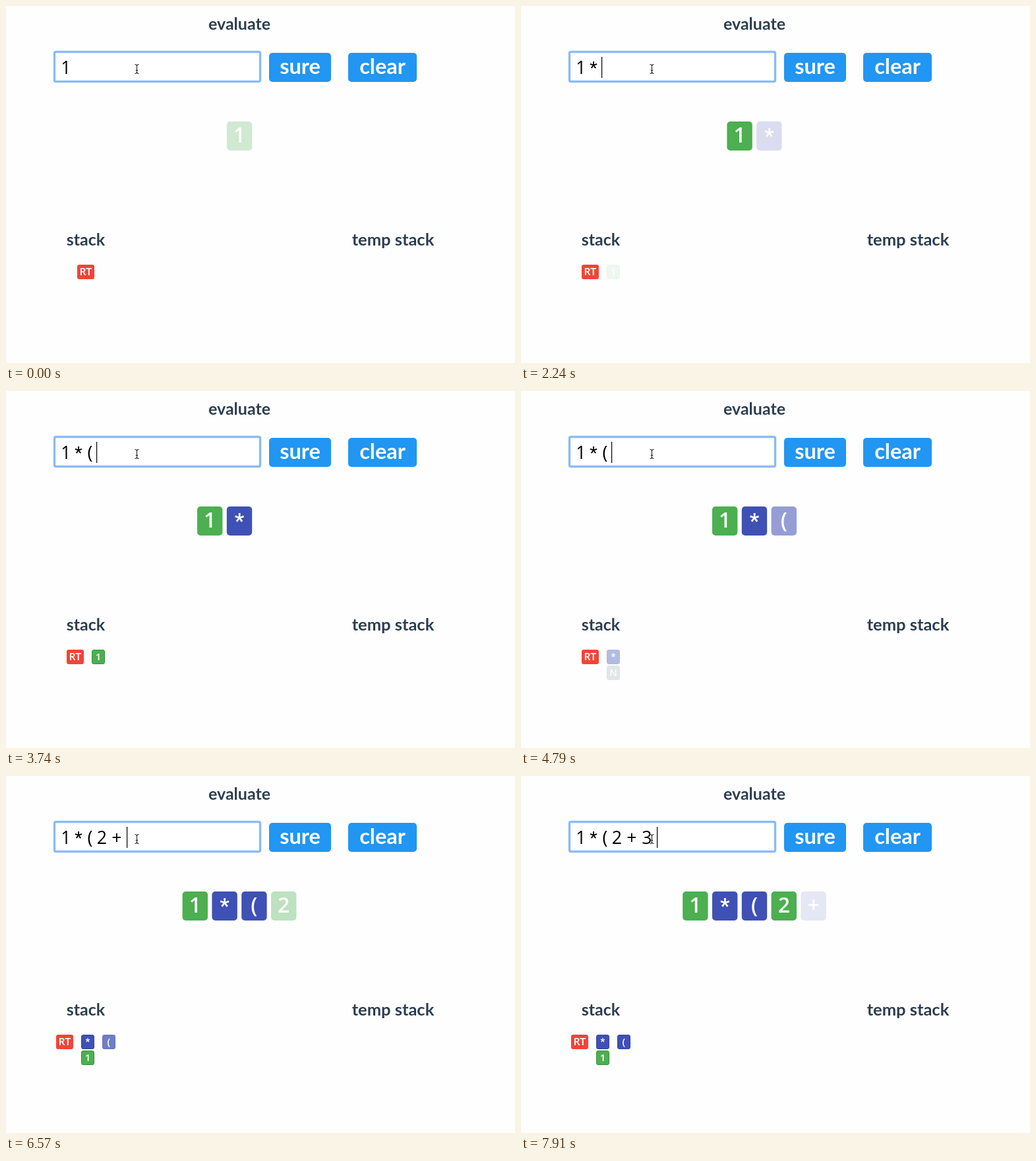
Write an HTML page that moves like this. It is 772 px wide and 541 px high and loops after 8 s.

```html
<!DOCTYPE html>
<html lang="en">
<head>
<meta charset="utf-8">
<title>evaluate</title>
<style>
html, body { margin: 0; width: 100%; height: 100%; overflow: hidden; background: #fefefe; }
svg { display: block; width: 772px; height: 541px; }
text { text-anchor: middle; }
.word { font-family: Lato, sans-serif; font-weight: 700; }
.glyph { font-family: "Open Sans", sans-serif; }
.star { font-family: Roboto, sans-serif; }
.bold { font-weight: 600; }
</style>
</head>
<body>
<svg id="stage" viewBox="0 0 772 541" xmlns="http://www.w3.org/2000/svg"></svg>
<script>
const LOOP = 8000;
const GREEN = '#4caf50', INDIGO = '#3f51b5', BLUE = '#2196f3', RED = '#f44336';
const GREY = '#b0bec5', INK = '#2c3e50';
const stage = document.getElementById('stage');

function add(parent, tag, attrs, content) {
  const el = document.createElementNS('http://www.w3.org/2000/svg', tag);
  for (const k in attrs) el.setAttribute(k, attrs[k]);
  if (content) el.textContent = content;
  parent.appendChild(el);
  return el;
}

function word(parent, str, x, y, size, fill) {
  return add(parent, 'text', { class: 'word', x, y, 'font-size': size, fill }, str);
}

function glyph(parent, ch, x, y, size, fill, bold) {
  const cls = (ch === '*' ? 'star' : 'glyph') + (bold ? ' bold' : '');
  return add(parent, 'text', { class: cls, x, y, 'font-size': size, fill }, ch);
}

function button(str, x, w) {
  add(stage, 'rect', { x, y: 71, width: w, height: 44, rx: 5, fill: BLUE });
  word(stage, str, x + w / 2, 103, 32.5, '#fff');
}

function bigTile(ch, fill) {
  const g = add(stage, 'g', {});
  add(g, 'rect', { y: 175, width: 38.4, height: 44, rx: 5, fill });
  glyph(g, ch, 19.2, 207, 32, '#fff', true);
  return g;
}

function smallTile(ch, fill, edge) {
  const g = add(stage, 'g', {});
  add(g, 'rect', { x: 0.5, y: 0.5, width: 19, height: 21, rx: 2.5, fill, stroke: edge });
  glyph(g, ch, 10, 16, 15, '#fff', true);
  return g;
}

function place(el, x, y, alpha) {
  el.setAttribute('transform', `translate(${x} ${y})`);
  el.setAttribute('opacity', alpha);
}

const show = (el, on) => el.setAttribute('opacity', on ? 1 : 0);
const ramp = (t, start, length) => Math.min(1, Math.max(0, (t - start) / length));

// Fixed parts
add(stage, 'rect', { width: 772, height: 541, fill: '#fefefe' });
word(stage, 'evaluate', 354, 36, 25, INK);
word(stage, 'stack', 121, 363, 25, INK);
word(stage, 'temp stack', 587, 363, 25.5, INK);
const field = { x: 73.5, y: 69.5, width: 312, height: 45, rx: 2 };
add(stage, 'rect', { ...field, fill: '#fff', stroke: '#bcd9fb', 'stroke-width': 4 });
add(stage, 'rect', { ...field, fill: 'none', stroke: '#7ab0f5', 'stroke-width': 2 });
button('sure', 399, 94);
button('clear', 519, 104);

// Typing: each key is followed by a space, after which the caret sits at "end"
const keys = [
  { ch: '1', x: 91, end: 104.5, at: -650, space: -500 },
  { ch: '*', x: 110, end: 122.5, at: 1790, space: 1940 },
  { ch: '(', x: 127.5, end: 137.5, at: 3590, space: 3740 },
  { ch: '2', x: 145.5, end: 159.5, at: 5380, space: 5530 },
  { ch: '+', x: 168, end: 183.5, at: 6300, space: 6440 },
  { ch: '3', x: 191, end: 206.5, at: 7600, space: 7700 }
];
for (const k of keys) k.el = glyph(stage, k.ch, k.x, 103, 26.7, '#000');
const caret = add(stage, 'rect', { y: 77, width: 1.2, height: 32, fill: '#000' });

// Mouse pointer
const beam = 'M195.5 88.5Q198 88.5 198.5 90.5Q199 88.5 201.5 88.5M198.5 90V100.5' +
  'M195.5 102.5Q198 102.5 198.5 100.5Q199 102.5 201.5 102.5M196.8 97.5H200.2';
add(stage, 'path', { d: beam, fill: 'none', stroke: '#fff', 'stroke-width': 2.4, opacity: 0.7 });
add(stage, 'path', { d: beam, fill: 'none', stroke: '#222', 'stroke-width': 1.1 });

// Token row: "slot" reserves the space, "fade" starts the colour
const tokens = [
  { ch: '1', fill: GREEN, slot: -600, fade: -375 },
  { ch: '*', fill: INDIGO, slot: 1790, fade: 1965 },
  { ch: '(', fill: INDIGO, slot: 3740, fade: 3960 },
  { ch: '2', fill: GREEN, slot: 5600, fade: 6035 },
  { ch: '+', fill: INDIGO, slot: 7540, fade: 7715 }
];
for (const k of tokens) k.el = bigTile(k.ch, k.fill);

// Stack
const PUSH = { one: 2200, star: 4600, operand: 5200, paren: 6200 };
const root = add(stage, 'g', {});
add(root, 'rect', { width: 26, height: 22, rx: 3, fill: RED });
word(root, 'RT', 13, 16, 15, '#fff');
const blank = smallTile('N', GREY, GREY);
const one = smallTile('1', GREEN, '#3b8c40');
const star = smallTile('*', INDIGO, '#35459f');
const paren = smallTile('(', INDIGO, '#35459f');

function drawTyping(t) {
  let last = keys[0];
  for (const k of keys) {
    const on = t >= k.at;
    show(k.el, on);
    if (on) last = k;
  }
  const spaced = t >= last.space;
  caret.setAttribute('x', last.end - (spaced ? 0.5 : 7));
  show(caret, !spaced || Math.floor((t - last.space) / 500) % 2 === 0);
}

function drawTokens(t) {
  const count = tokens.filter(k => t >= k.slot).length;
  const left = 354 - (count * 44.8 - 6.4) / 2;
  tokens.forEach((k, i) => place(k.el, left + i * 44.8, 0, ramp(t, k.fade, 1500)));
}

function drawStack(t) {
  const depth = (t >= PUSH.one) + (t >= PUSH.paren);
  const x = 108 - 16 * depth;
  const nested = t >= PUSH.star;
  const starAlpha = ramp(t, PUSH.star, 500);
  const operandAlpha = ramp(t, PUSH.operand, 400);
  place(root, x, 392, 1);
  place(star, x + 38, 392, starAlpha);
  place(blank, x + 38, 416, operandAlpha < 1 ? starAlpha : 0);
  place(one, x + 38, nested ? 416 : 392, nested ? operandAlpha : ramp(t, PUSH.one, 500));
  place(paren, x + 70, 392, ramp(t, PUSH.paren, 500));
}

function draw(t) {
  drawTyping(t);
  drawTokens(t);
  drawStack(t);
}

const begin = performance.now();
function tick() {
  draw((performance.now() - begin) % LOOP);
  requestAnimationFrame(tick);
}
draw(0);
requestAnimationFrame(tick);
</script>
</body>
</html>
```
